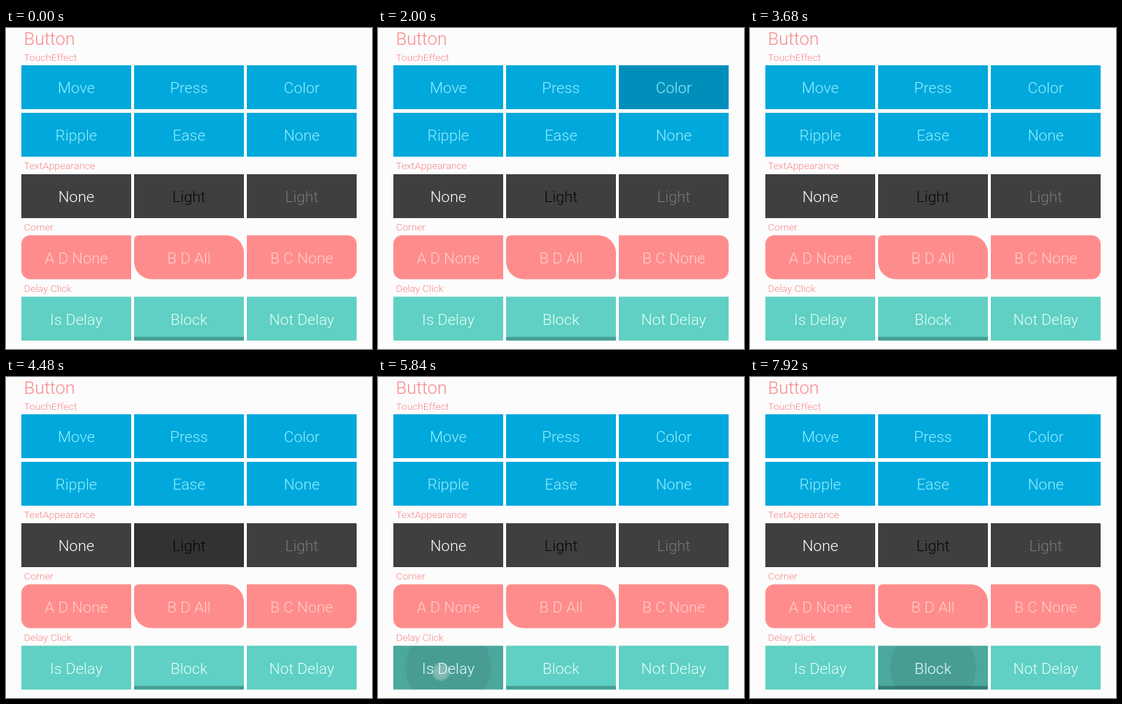
Recreate the animation shown at these times as an HTML page with a canvas. Size 500 px wide and 439 px high, loop 8000 ms.

```html
<!DOCTYPE html>
<html lang="en">
<head>
<meta charset="utf-8">
<title>Button effects</title>
<style>
html, body { margin: 0; width: 500px; height: 439px; overflow: hidden; background: #fcfcfc; }
canvas { display: block; }
</style>
</head>
<body>
<canvas id="stage" width="500" height="439"></canvas>
<script>
const ctx = document.getElementById('stage').getContext('2d');
const LOOP = 8000, STEP = 80, W = 150, H = 60, ENTER = 240, EXIT = 160;
const COLS = [21, 175, 329];
const BLUE = '#00a8dc', CYAN = '#8ff0ff', PINK = '#f9898c';

const rows = [
  { y: 51, fill: BLUE, ink: CYAN, labels: ['Move', 'Press', 'Color'] },
  { y: 116, fill: BLUE, ink: CYAN, labels: ['Ripple', 'Ease', 'None'] },
  { y: 200, fill: '#3f3f3f', inks: ['#ffffff', '#080808', '#777777'], labels: ['None', 'Light', 'Light'] },
  { y: 283.5, fill: '#ff8c8c', ink: '#ffd0cc', labels: ['A D None', 'B D All', 'B C None'],
    corners: [[12, 0, 0, 12], [6, 24, 6, 24], [0, 12, 12, 0]] },
  { y: 367.5, fill: '#5fd0c3', ink: '#e4fffa', labels: ['Is Delay', 'Block', 'Not Delay'] }
];

// Each tap: button, effect, start, finger lifted, effect over, finger position
const taps = [
  { row: 0, col: 0, effect: 'move', start: 60, up: 300, end: 840, x: 84, y: 90 },
  { row: 0, col: 1, effect: 'press', start: 900, up: 1130, end: 1620, x: 240, y: 90 },
  { row: 0, col: 2, effect: 'ease', start: 1640, up: 1880, end: 2260, x: 398, y: 92 },
  { row: 1, col: 0, effect: 'ripple', start: 2240, up: 2480, end: 2860, x: 88, y: 160 },
  { row: 1, col: 1, effect: 'ease', start: 2820, up: 3100, end: 3500, x: 231, y: 165 },
  { row: 1, col: 2, effect: 'none', start: 3510, up: 3670, end: 3670, x: 407, y: 158 },
  { row: 2, col: 1, effect: 'ease', start: 3830, up: 4080, end: 4640, x: 236, y: 240 },
  { row: 3, col: 1, effect: 'move', start: 4640, up: 4880, end: 5440, x: 230, y: 320 },
  { row: 4, col: 0, effect: 'move', start: 5560, up: 5900, end: 6240, x: 86, y: 403 },
  { row: 4, col: 1, effect: 'move', start: 7560, up: 7800, end: 8300, x: 238, y: 402 }
];

const clamp = v => Math.max(0, Math.min(1, v));
const mix = (a, b, k) => a + (b - a) * k;
const black = a => `rgba(0,0,0,${a})`;

function text(str, x, y, size, color, weight = 300, align = 'left') {
  ctx.font = `${weight} ${size}px Roboto, sans-serif`;
  ctx.textAlign = align;
  ctx.fillStyle = color;
  ctx.fillText(str, x, y);
}

function disc(x, y, r, color) {
  ctx.fillStyle = color;
  ctx.beginPath();
  ctx.arc(x, y, r, 0, 7);
  ctx.fill();
}

function drawEffect(tap, x, y, t) {
  if (tap.effect === 'none') return;
  const p = clamp((t - tap.start) / ENTER);
  const k = 1 - (1 - p) ** 3;
  const fade = clamp((tap.end - t) / EXIT);
  const cx = x + W / 2, cy = y + H / 2;
  const shade = tap.row < 2 ? 0.15 : 0.2;
  const veil = { press: 0.04, ripple: 0.05 }[tap.effect] || shade;
  ctx.fillStyle = black(veil * k * fade);
  ctx.fillRect(x, y, W, H);
  if (tap.effect === 'move')
    disc(mix(tap.x, cx, k), mix(tap.y, cy, k), 58.5 * k, black(0.06 * fade));
  if (tap.effect === 'press') disc(cx, cy, 67.5 * k, black(0.14 * fade));
  if (tap.effect === 'ripple') disc(tap.x, tap.y, 110 * k, black(0.12 * fade));
}

function drawButton(r, c, t) {
  const row = rows[r], x = COLS[c], y = row.y;
  ctx.save();
  ctx.beginPath();
  ctx.roundRect(x, y, W, H, row.corners ? row.corners[c] : 0);
  ctx.fillStyle = row.fill;
  ctx.fill();
  ctx.clip();
  if (r === 4 && c === 1) {
    ctx.fillStyle = '#459d92';
    ctx.fillRect(x, y + H - 5, W, 5);
  }
  for (const tap of taps)
    if (tap.row === r && tap.col === c && t >= tap.start && t < tap.end) drawEffect(tap, x, y, t);
  ctx.restore();
  text(row.labels[c], x + W / 2, y + 38, 21, row.inks ? row.inks[c] : row.ink, 300, 'center');
}

function drawButtons(t) {
  text('Button', 24.5, 23, 24, PINK);
  [['TouchEffect', 45], ['TextAppearance', 193], ['Corner', 277], ['Delay Click', 361]]
    .forEach(([label, y]) => text(label, 24.5, y, 13.7, PINK));
  rows.forEach((row, r) => COLS.forEach((_, c) => drawButton(r, c, t)));
  for (const tap of taps) {
    if (t < tap.start || t >= tap.up) continue;
    disc(tap.x, tap.y, 12.5, 'rgba(255,255,255,.2)');
    disc(tap.x, tap.y, 9.5, 'rgba(255,255,255,.14)');
  }
}

function frame(now) {
  const t = Math.floor(now % LOOP / STEP) * STEP;
  const second = t >= 6560 && t < 7280;
  ctx.fillStyle = second ? '#fefefe' : '#fcfcfc';
  ctx.fillRect(0, 0, 500, 439);
  if (second) text('TwoActivity', 37, 33, 16.4, '#555555', 400);
  else drawButtons(t);
  requestAnimationFrame(frame);
}
requestAnimationFrame(frame);
</script>
</body>
</html>
```
